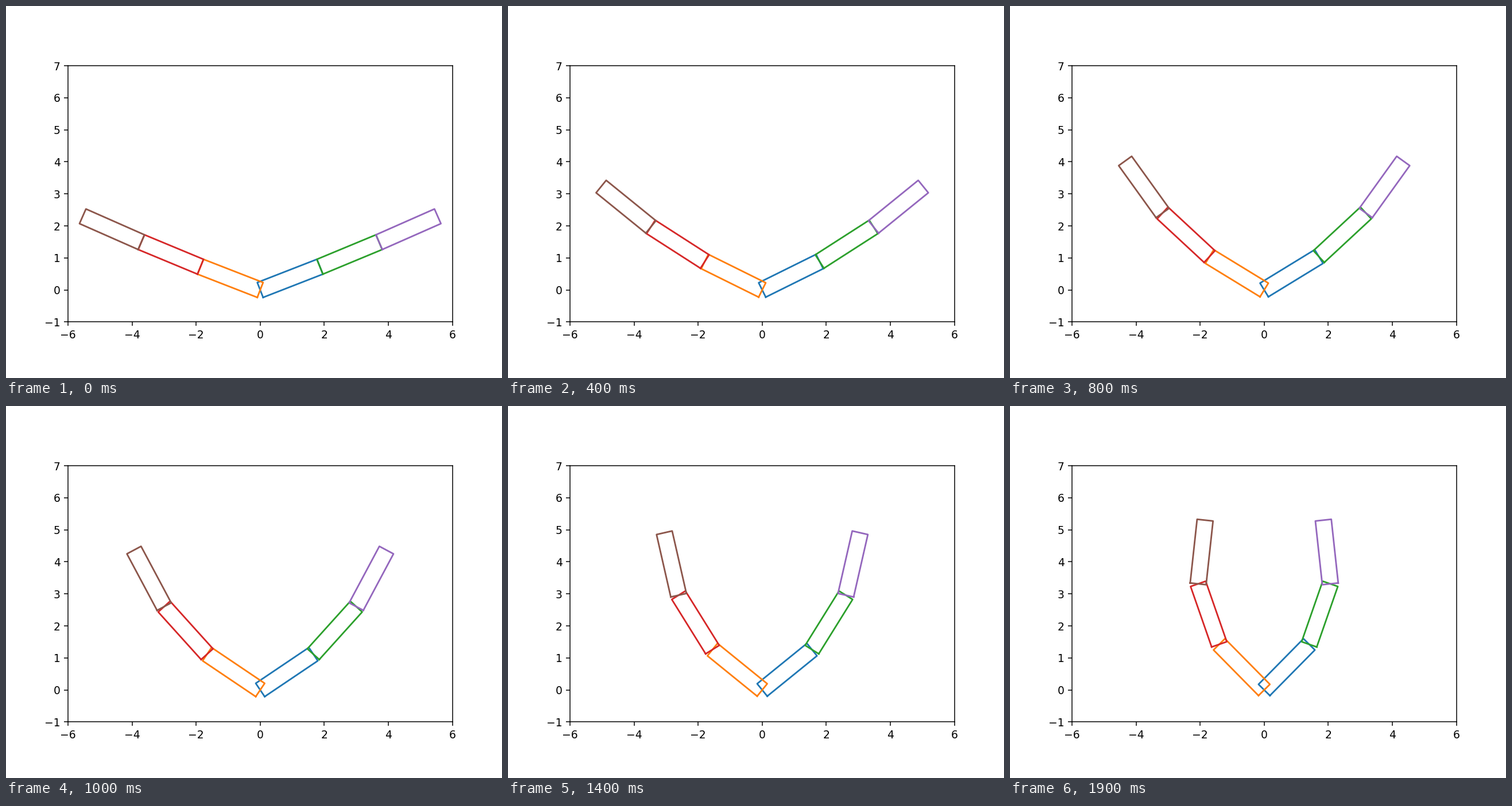
Write a matplotlib script that moves like this. It is 864x648 px and loops after 2000 ms.

```python
import numpy as np
import matplotlib.pyplot as plt
from matplotlib.animation import FuncAnimation

FRAMES = 20
INTERVAL = 100
LENGTH, WIDTH = 2.0, 0.5
BASE_ANGLE = 20.0   # degrees
BEND_STEP = 1.27    # degrees added to every joint per frame
LINKS = 3

fig = plt.figure(figsize=(6.4, 4.8), dpi=135, facecolor="white")
ax = fig.add_subplot()
ax.set_aspect("equal")
ax.set_xlim(-6, 6)
ax.set_ylim(-1, 7)
ax.set_xticks(range(-6, 7, 2))
ax.set_yticks(range(-1, 8))

# Even entries form the right finger, odd ones the left finger.
lines = [ax.plot([], [], color=f"C{i}", lw=1.5)[0] for i in range(2 * LINKS)]


def link_outline(start, angle):
    """Closed outline of a link and the midpoint of its far end."""
    along = np.array([np.cos(angle), np.sin(angle)])
    side = np.array([-along[1], along[0]]) * WIDTH / 2
    end = start + LENGTH * along
    corners = [start - side, end - side, end + side, start + side, start - side]
    return np.array(corners), end


def update(frame):
    bend = BEND_STEP * (frame + 1)
    joint = np.zeros(2)
    for i in range(LINKS):
        angle = np.radians(BASE_ANGLE + (i + 1) * bend)
        outline, joint = link_outline(joint, angle)
        x, y = outline.T
        lines[2 * i].set_data(x, y)
        lines[2 * i + 1].set_data(-x, y)
    return lines


anim = FuncAnimation(fig, update, frames=FRAMES, interval=INTERVAL,
                     init_func=lambda: update(0), repeat=True,
                     repeat_delay=0, blit=False)
plt.show()
```
